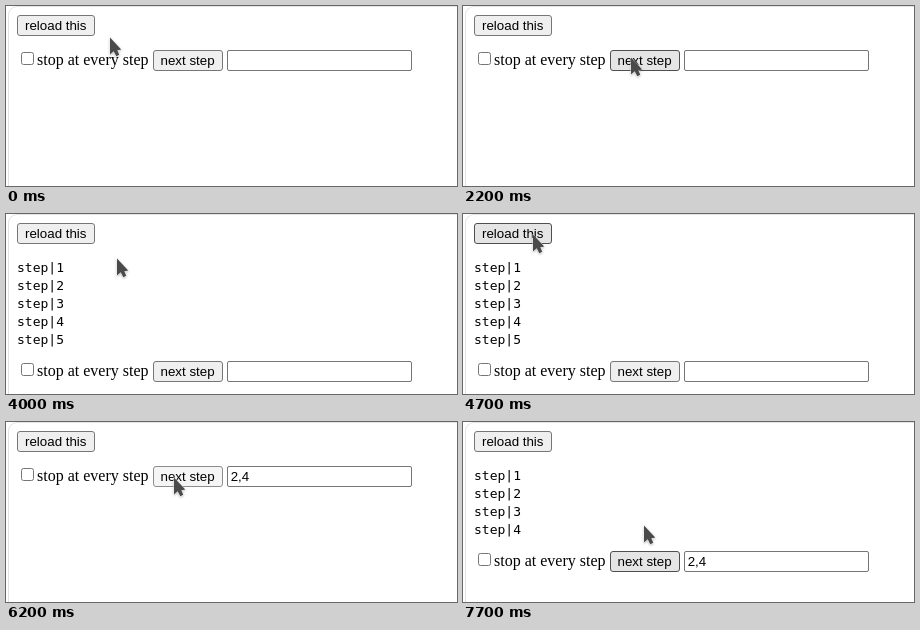
Recreate the animation shown at these times as an HTML page. Size 451 by 180 pixels, loop 8 s.

```html
<!DOCTYPE html>
<html lang="en">
<head>
<meta charset="utf-8">
<title>Step demo</title>
<style>
  html, body { margin: 0; width: 100%; height: 100%; overflow: hidden; background: #fff; }
  body { position: relative; font: 16px "Liberation Serif", serif; color: #000; user-select: none; cursor: default; }
  .page { position: absolute; left: 2px; top: 0; width: 470px; height: 200px; border: 1px solid #e3e3e3; border-radius: 9px; }
  .button, .field {
    display: inline-block; box-sizing: border-box; height: 21px;
    border: 1px solid #767676; font: 13.3333px/15px "Liberation Sans", sans-serif;
  }
  .button { padding: 2px 7px; border-radius: 3px; background: #efefef; }
  .button.hover { background: #e5e5e5; border-color: #4f4f4f; }
  .button.active { background: #f5f5f5; border-color: #8d8d8d; }
  .field { width: 185px; padding: 2px 3px; border-radius: 2px; vertical-align: top; }
  #reload { position: absolute; left: 11px; top: 9px; }
  #list { position: absolute; left: 11px; top: 46px; }
  #list div { font: 13px/15px "DejaVu Sans Mono", monospace; margin-bottom: 3px; }
  #form { position: absolute; left: 11px; white-space: nowrap; }
  #check {
    display: inline-block; box-sizing: border-box; width: 13px; height: 13px; margin: 0 3px 0 4px;
    border: 1px solid #767676; border-radius: 2.5px;
  }
  #check.hover { border-color: #4f4f4f; }
  #pointer { position: absolute; left: 0; top: 0; overflow: visible; filter: drop-shadow(0 1px 1px rgba(0, 0, 0, .25)); }
</style>
</head>
<body>
<div class="page"></div>
<div class="button" id="reload">reload this</div>
<div id="list"></div>
<div id="form"><span id="check"></span>stop at every step <span class="button" id="next">next step</span> <span class="field" id="field"></span></div>
<svg id="pointer" width="14" height="21">
  <path d="M1 .5V17.5L4.7 14.2L7.3 19.3L10.3 17.8L8.3 13.2L12.3 12.4Z" fill="#4a4a4a" stroke="#fff" stroke-width=".8" stroke-linejoin="round" paint-order="stroke"/>
</svg>
<script>
  const LOOP = 8000, TICK = 100;
  const el = id => document.getElementById(id);

  // Each run starts at a time and lists pointer places one tick apart.
  const runs = [
    [0, [103, 31]],
    [800, [88, 28]],
    [1100, [88, 27]],
    [1500, [70, 20]],
    [1900, [98, 35], [130, 53], [156, 61], [167, 51]],
    [4000, [110, 44], [92, 33], [79, 25], [72, 21], [70, 20], [69, 20]],
    [5000, [84, 29], [106, 40], [124, 49], [137, 52], [147, 53], [154, 53], [159, 53], [163, 54], [165, 54]],
    [5900, [167, 55]],
    [6600, [168, 58], [171, 66], [175, 75], [177, 82], [178, 87], [179, 91], [179, 93]],
    [7400, [180, 103]]
  ];

  // Timed values: [time, value], each kept until the next.
  const reload = [[0, ""], [1500, "hover"], [1700, "active"], [1800, ""],
    [4200, "hover"], [4600, "active"], [4700, "hover"], [4800, ""]];
  const next = [[0, ""], [2100, "hover"], [3000, "active"], [3100, "hover"], [4000, ""],
    [5400, "hover"], [6200, "active"], [6300, "hover"], [6600, ""],
    [7200, "hover"], [7600, "active"], [7700, "hover"]];
  const check = [[0, ""], [2000, "hover"], [2100, ""], [5200, "hover"], [5400, ""]];
  const steps = [[0, 0], [3100, 5], [4800, 0], [6300, 2], [7700, 4]];
  const text = [[0, ""], [4800, "2,4"]];

  const latest = (list, t) => list.findLast(item => item[0] <= t);
  const value = (list, t) => latest(list, t)[1];

  function pointerAt(t) {
    const [start, ...places] = latest(runs, t);
    return places[Math.min(places.length - 1, Math.floor((t - start) / TICK))];
  }

  let shown = -1;
  function showSteps(count) {
    if (count === shown) return;
    shown = count;
    el("list").innerHTML = Array.from({ length: count }, (_, i) => `<div>step|${i + 1}</div>`).join("");
    el("form").style.top = (count ? 57 + 18 * count : 44) + "px";
  }

  function draw(now) {
    const t = now % LOOP;
    const [x, y] = pointerAt(t);
    el("pointer").style.transform = `translate(${x}px, ${y}px)`;
    el("reload").className = "button " + value(reload, t);
    el("next").className = "button " + value(next, t);
    el("check").className = value(check, t);
    el("field").textContent = value(text, t);
    showSteps(value(steps, t));
  }

  const begin = performance.now();
  function frame() {
    draw(performance.now() - begin);
    requestAnimationFrame(frame);
  }
  frame();
</script>
</body>
</html>
```
